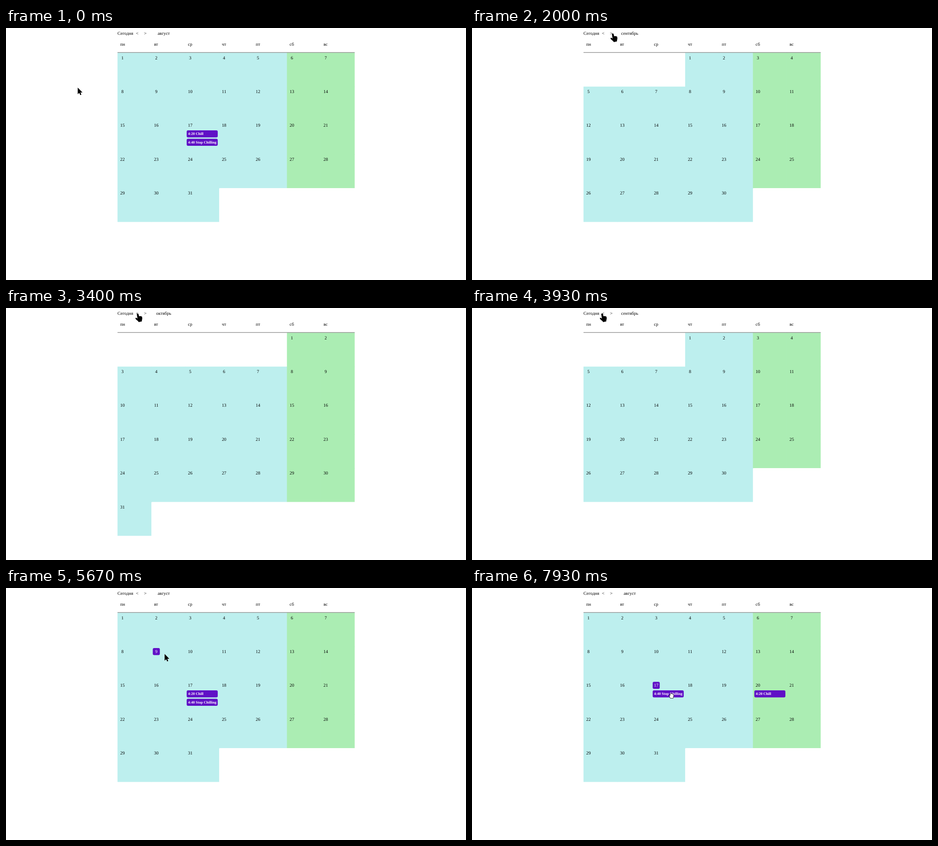
An HTML page that plays this animation: 1010 px wide and 554 px high, repeating every 8 s.

```html
<!DOCTYPE html>
<html lang="ru">
<head>
<meta charset="utf-8">
<title>Календарь</title>
<style>
  html, body { margin: 0; width: 100%; height: 100%; overflow: hidden; background: #fff; }
  svg { display: block; width: 1010px; height: 554px; }
  text { font: 9.92px "Liberation Serif", "Times New Roman", serif; fill: #000; text-rendering: geometricPrecision; }
  .mid { text-anchor: middle; }
  .on { fill: #fff; }
  .ev { font-size: 8.06px; font-weight: bold; fill: #fff; }
</style>
</head>
<body>
<svg id="stage" viewBox="0 0 1010 554" xmlns="http://www.w3.org/2000/svg"></svg>
<script>
const LOOP = 8000, FPS = 15;
const X0 = 244.8, Y0 = 54.4, CELL = 74.4, PAD = 3.1, BAR = 15.5, BAR_W = 68.2;
const WORK = [189, 239, 238], REST = [171, 237, 179], ACCENT = '#6010c6';
const WEEK = ['пн', 'вт', 'ср', 'чт', 'пт', 'сб', 'вс'];
const AUG = { name: 'август', first: 0, days: 31 };
const SEP = { name: 'сентябрь', first: 3, days: 30 };
const OCT = { name: 'октябрь', first: 5, days: 31 };

const VIEWS = [[0, AUG], [1900, SEP], [2500, OCT], [3578, SEP], [4899, AUG]];
const FADE = 100;
const GRAB = 6070, DRAG = 6270, DROP = 6800;
const GRIP = [32, 12], LAG = 27;

const soft = u => u * u * (3 - 2 * u);
const out = u => u * (2 - u);

// pointer moves: when, where to, vertical sag, easing
const START = [157.5, 131];
const MOVES = [
  { from: 0, to: 130, x: 157.5, y: 133.5 },
  { from: 400, to: 1270, x: 308, y: 16, sag: -20 },
  { from: 1270, to: 1530, x: 309, y: 12 },
  { from: 2870, to: 3400, x: 289, y: 12 },
  { from: 3870, to: 4130, x: 266, y: 12 },
  { from: 5400, to: 5930, x: 429, y: 236, sag: 20 },
  { from: 6200, to: DROP, x: 667, y: 230.4, ease: out },
  { from: 6930, to: 7470, x: 429, y: 232.5, sag: 24 },
  { from: 7670, to: 7930, x: 438, y: 237 }
];

const HAND = 'M-1.8 2Q-1.5-.2.3 0Q1.6.2 2 1.8L3.2 6.2Q4.6 5.2 5.8 6Q7.2 5.4 8.2 6.6Q9.8 6.4 10 8.4' +
  'Q10.7 11.5 9.4 14.5L9.2 17.4L2.2 19L1.2 17Q-2.6 14.8-4.7 11.6Q-5.4 9.8-3.8 9.4Q-2 9.3-.3 11.2Z';
const ARROW = 'M0 0V14.6L3.4 11.5L5.6 16.5L8 15.5L5.9 10.7H10.4Z';
const THIN = 'M0 0V11L2.5 8.6L4.2 12.3L5.8 11.6L4.2 8H7.5Z';
const PALM = 'M-2.4 5L-4.4.6Q-4.6-.8-3.4-.7L-2.4.6L-3-3Q-2.6-4.4-1.6-3.4Q-1.2-5.4 0-4.4Q1.2-5.2 1.7-3.6' +
  'Q3.2-4 3.3-2.4Q4.8-2.4 4.6-.6L3.4 5Z';
const FIST = 'M-2.8 5L-4.6 1.6Q-4.8-.2-3.4-.4L-3.2-2.4Q-2.2-3.6-1.2-2.8Q0-3.8 1.2-2.8Q2.6-3.2 3.2-2' +
  'Q4.8-1.8 4.6.4L3.4 5Z';

const stage = document.getElementById('stage');
const label = (x, y, s, cls = '') => `<text x="${x}" y="${y}" class="${cls}">${s}</text>`;
const box = (x, y, w, h, fill, extra = '') =>
  `<rect x="${x}" y="${y}" width="${w}" height="${h}" fill="${fill}" ${extra}/>`;
const shape = (d, fill, stroke, w) =>
  `<path d="${d}" fill="${fill}" stroke="${stroke}" stroke-width="${w}" stroke-linejoin="round" paint-order="stroke"/>`;
const shade = (m, d) => (m.first + d - 1) % 7 > 4 ? REST : WORK;
const within = (p, x, y, w, h) => p[0] >= x && p[0] < x + w && p[1] >= y && p[1] < y + h;

function pointer(t) {
  let [x, y] = START;
  for (const m of MOVES) {
    if (t <= m.from) break;
    const u = Math.min(1, (t - m.from) / (m.to - m.from));
    const e = (m.ease || soft)(u);
    x += (m.x - x) * e;
    y += (m.y - y) * e + (m.sag || 0) * 4 * u * (1 - u);
  }
  return [x, y];
}

function place(m, d) {
  const n = m.first + d - 1;
  return [X0 + n % 7 * CELL, Y0 + Math.floor(n / 7) * CELL];
}

function plans(m, t) {
  if (m !== AUG) return [];
  const slot = (d, n, s) => {
    const [x, y] = place(m, d);
    return { x: x + PAD, y: y + PAD + (n + 1) * (BAR + PAD), s };
  };
  return t < DROP
    ? [slot(17, 0, '4:20 Chill'), slot(17, 1, '4:40 Stop Chilling')]
    : [slot(17, 0, '4:40 Stop Chilling'), slot(20, 0, '4:20 Chill')];
}

const bar = e => box(e.x, e.y, BAR_W, BAR, ACCENT, 'rx="3"') +
  label(e.x + PAD, e.y + BAR / 2 + 2.72, e.s, 'ev');

function cursor(t, p, events) {
  let mark;
  const control = [[245, 36], [283, 11], [300, 12]].some(c => within(p, c[0], 6, c[1], 14));
  if (t >= DRAG && t < DROP) {
    mark = shape(THIN, '#fff', '#000', 1) +
      box(5.5, 12.5, 7, 6.5, '#fff', 'stroke="#000" stroke-width=".8"') +
      '<path d="M7.2 15.75H10.8M9 14V17.5" stroke="#000"/>';
  } else if (t >= GRAB && t < DRAG) {
    mark = shape(FIST, '#fff', '#000', 1.6);
  } else if (events.some(e => within(p, e.x, e.y, BAR_W, BAR))) {
    mark = shape(PALM, '#fff', '#000', 1.4);
  } else {
    mark = shape(control ? HAND : ARROW, '#000', '#fff', .6);
  }
  return `<g transform="translate(${p[0]} ${p[1]})">${mark}</g>`;
}

function draw(t) {
  const v = VIEWS.findLastIndex(k => k[0] <= t);
  const [start, m] = VIEWS[v];
  const old = v ? VIEWS[v - 1][1] : m;
  const mix = soft(Math.min(1, (t - start) / FADE));
  const p = pointer(t), events = plans(m, t);
  const drag = t >= DRAG && t < DROP;
  let cells = '', text = '';

  for (let d = 1; d <= m.days; d++) {
    const [x, y] = place(m, d);
    const to = shade(m, d), from = d <= old.days ? shade(old, d) : to;
    const rgb = to.map((c, i) => Math.round(from[i] + (c - from[i]) * mix));
    // run under the next neighbours so no seam shows
    const right = d < m.days && (m.first + d) % 7 ? .7 : 0;
    const down = d + 7 <= m.days ? .7 : 0;
    cells += box(x, y, CELL + right, CELL + down, `rgb(${rgb})`);
    const hot = drag ? d === 17 : within(p, x, y, CELL, CELL);
    if (hot) text += box(x + PAD, y + PAD, BAR, BAR, ACCENT, 'rx="3"');
    text += label(x + PAD + BAR / 2, y + PAD + BAR / 2 + 3.35, d, hot ? 'mid on' : 'mid');
  }

  let art = cells + box(X0, 53.4, 7 * CELL, .9, '#555') + text;
  art += label(X0, 15.3, 'Сегодня') + label(285.3, 15.3, '&lt;') + label(303.1, 15.3, '&gt;');
  art += label(346.3, 15.3, m.name, 'mid');
  WEEK.forEach((s, i) => art += label(X0 + i * CELL + 6, 38.6, s));
  art += events.map(bar).join('');
  if (drag) {
    const g = pointer(t - LAG);
    art += `<g opacity=".75">${bar({ x: g[0] - GRIP[0], y: g[1] - GRIP[1], s: '4:20 Chill' })}</g>`;
  }
  stage.innerHTML = art + cursor(t, p, events);
}

let last = -1;
const begin = performance.now();
function tick() {
  const t = Math.max(0, performance.now() - begin) % LOOP;
  const step = Math.floor((t + 5) * FPS / 1000) % (LOOP * FPS / 1000);
  if (step !== last) draw((last = step) * 1000 / FPS);
  requestAnimationFrame(tick);
}
tick();
</script>
</body>
</html>
```
